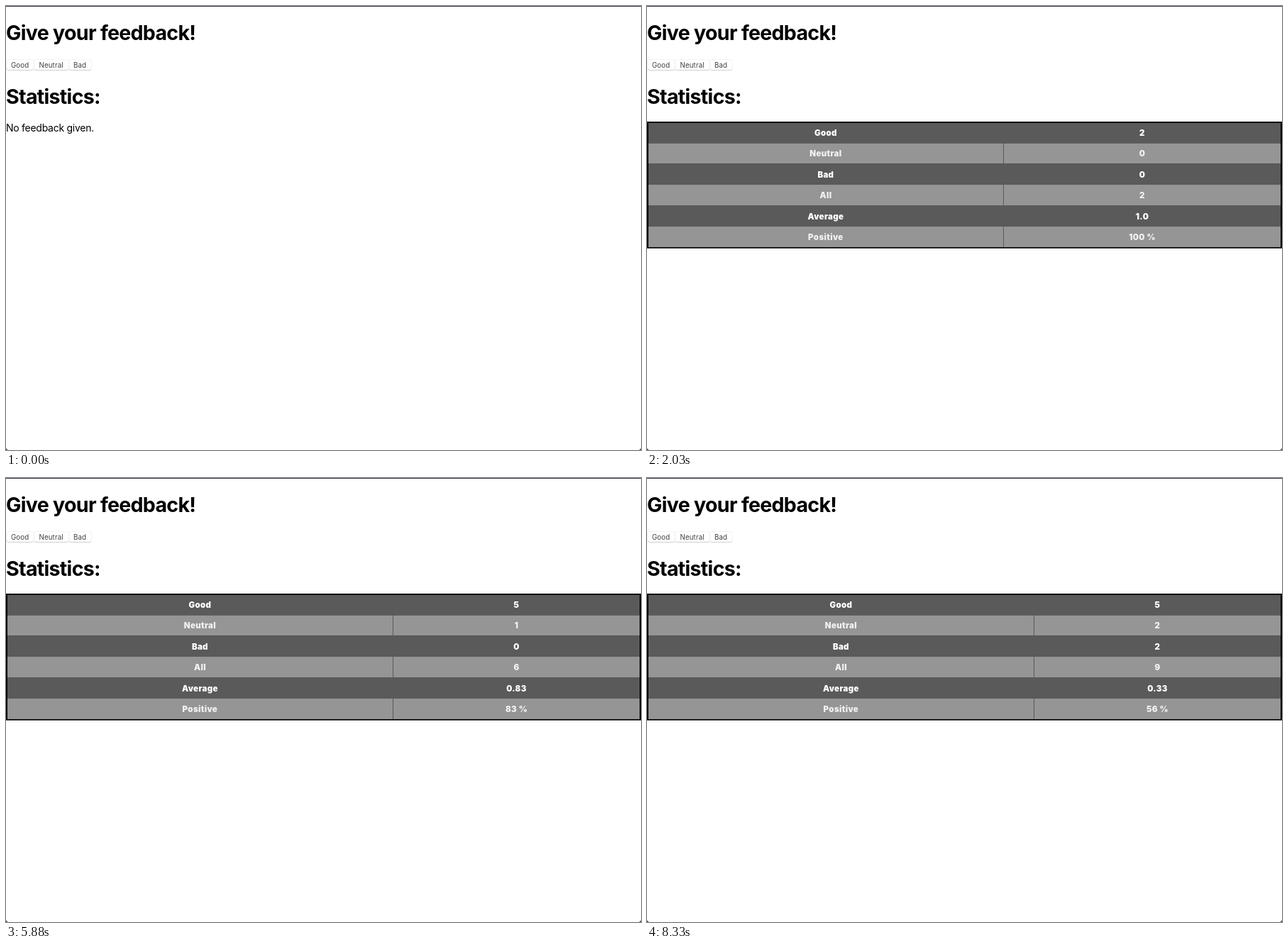
An HTML page for the animation above (9310 ms loop, 895x626 px).

```html
<!DOCTYPE html>
<html lang="en">
<head>
<meta charset="utf-8">
<title>Feedback</title>
<style>
  html, body { margin: 0; width: 100%; height: 100%; overflow: hidden; background: #fff; }
  svg { display: block; }
  text { font-family: Inter, "Liberation Sans", sans-serif; font-optical-sizing: none; }
  .title { font-size: 28.6px; font-weight: 700; letter-spacing: -.72px; }
  .note { font-size: 14px; letter-spacing: -.27px; }
  .label { font-size: 9.8px; letter-spacing: .08px; fill: #444; text-anchor: middle; }
  .cell { font-size: 11.5px; font-weight: 900; letter-spacing: .35px; text-anchor: middle; }
</style>
</head>
<body>
<svg id="stage" width="895" height="626" viewBox="0 0 895 626">
  <defs>
    <linearGradient id="blue" x1="0" y1="0" x2="0" y2="1">
      <stop offset="0" stop-color="#6aa0f8"/>
      <stop offset="1" stop-color="#3a6ce0"/>
    </linearGradient>
  </defs>
  <rect width="895" height="626" fill="#fff"/>
  <rect width="895" height="1" fill="#34364a"/>
  <path d="M0 622Q0 626 4 626H0ZM895 622Q895 626 891 626H895Z" fill="#333"/>
  <text class="title" x="0" y="47.5">Give your feedback!</text>
  <text class="title" x="0" y="137.5">Statistics:</text>
  <text class="note" id="note" x="0" y="176.7">No feedback given.</text>
  <g id="buttons"></g>
  <g id="table"></g>
</svg>
<script>
const LOOP = 9310;
const NAMES = ['Good', 'Neutral', 'Bad'];
const ROWS = [...NAMES, 'All', 'Average', 'Positive'];
const EDGES = [165, 193.5, 222.5, 252, 281, 311, 340];

// Each click: button index, press time, release time
const CLICKS = [
  [0, 1050, 1120], [0, 1750, 1890], [0, 2800, 2940], [0, 3570, 3710], [0, 4550, 4760],
  [1, 5670, 5880], [1, 6300, 6510],
  [2, 7280, 7420], [2, 8050, 8260]
];

const $ = id => document.getElementById(id);

function add(parent, tag, attrs, text = '') {
  const el = document.createElementNS('http://www.w3.org/2000/svg', tag);
  for (const key in attrs) el.setAttribute(key, attrs[key]);
  el.textContent = text;
  parent.appendChild(el);
  return el;
}

const buttons = [[1, 38], [40, 48], [89, 31]].map(([x, w], i) => {
  const g = $('buttons');
  add(g, 'rect', { x: x - .5, y: 75, width: w + 1, height: 16, rx: 3.5, fill: '#e9e9e9' });
  add(g, 'rect', { x, y: 76, width: w, height: 14.8, rx: 3, fill: '#c9c9c9' });
  add(g, 'rect', { x, y: 75.4, width: w, height: 14.6, rx: 3, fill: '#fff' });
  const glow = add(g, 'rect', {
    x: x - .3, y: 75, width: w + .6, height: 15.6, rx: 3,
    fill: 'url(#blue)', stroke: '#3c69c8', 'stroke-width': .6
  });
  const label = add(g, 'text', { class: 'label', x: x + w / 2 - .4, y: 86.5 }, NAMES[i]);
  return { glow, label };
});

const table = $('table');
add(table, 'rect', { x: 0, y: 163, width: 895, height: 178.7, fill: '#000' });
const rows = ROWS.map((name, i) => {
  const y = EDGES[i], height = EDGES[i + 1] - y, light = i % 2;
  add(table, 'rect', { x: 2, y, width: 891, height, fill: light ? '#959595' : '#5a5a5a' });
  const line = light && add(table, 'rect', { y, width: 1, height, fill: '#5a5a5a' });
  const cell = { class: 'cell', y: 182.8 + i * 29.45, fill: light ? '#f0f0f0' : '#fff' };
  return { line, key: add(table, 'text', cell, name), value: add(table, 'text', cell) };
});

function drawTable(counts) {
  const [good, neutral, bad] = counts;
  const all = good + neutral + bad;
  $('note').style.display = all ? 'none' : '';
  table.style.display = all ? '' : 'none';
  if (!all) return;

  const values = [
    ...counts, all,
    ((good - bad) / all).toPrecision(2),
    (good / all * 100).toFixed(0) + ' %'
  ];
  const split = good === all ? 502 : 545;
  rows.forEach((row, i) => {
    if (row.line) row.line.setAttribute('x', split);
    row.key.setAttribute('x', split / 2 + .9);
    row.value.setAttribute('x', (split + 894) / 2);
    row.value.textContent = values[i];
  });
}

function draw(t) {
  const counts = [0, 0, 0];
  let pressed = -1;
  for (const [button, down, up] of CLICKS) {
    if (t >= up) counts[button]++;
    else if (t >= down) pressed = button;
  }
  buttons.forEach(({ glow, label }, i) => {
    glow.style.display = i === pressed ? '' : 'none';
    label.style.fill = i === pressed ? '#16305f' : '';
  });
  drawTable(counts);
}

const start = performance.now();
function tick() {
  draw((performance.now() - start) % LOOP);
  requestAnimationFrame(tick);
}
tick();
</script>
</body>
</html>
```
